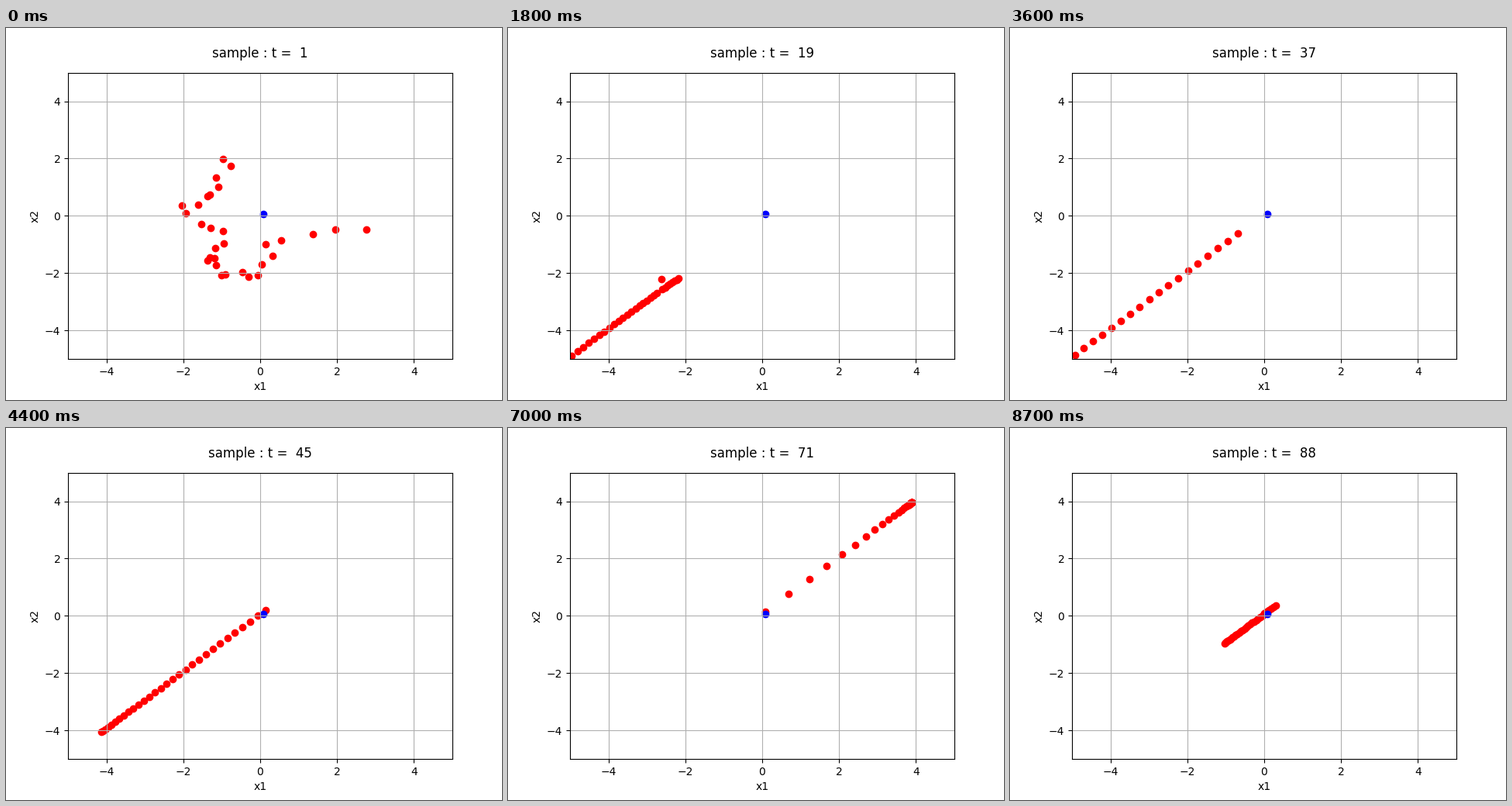
A matplotlib script that plays this animation: 640x480 px, repeating every 8800 ms.

```python
import numpy as np
import matplotlib.pyplot as plt
from matplotlib.animation import FuncAnimation

COUNT = 30
STEPS = 88
U = np.linspace(0, 1, COUNT)


def cloud():
    """Scatter the particles loosely along a winding path."""
    path = np.array([(-0.9, 2.0), (-1.05, 0.8), (-1.95, 0.1), (-1.0, -0.5),
                     (-1.3, -1.4), (-1.1, -2.0), (0.0, -2.1), (0.2, -0.9),
                     (2.8, -0.5)])
    knots = np.linspace(0, 1, len(path))
    points = np.column_stack([np.interp(U, knots, axis) for axis in path.T])
    return points + np.random.default_rng(4).normal(0, 0.1, points.shape)


def chain(a, b, power, slope=1.0, shift=0.07):
    """Diagonal row of particles from a to b, denser towards b."""
    x = a + (b - a) * (1 - (1 - U) ** power)
    return np.column_stack([x, slope * x + shift])


rise = chain(-1.45, 1.51, 2, slope=1.05, shift=0.005)
rise[8] += (0.08, 0.8)  # one particle strays from the row

# time, pose, and how far the swarm swings on its way to the next pose
POSES = [
    (1, cloud(), 4),
    (10, rise, -5),
    (29, chain(-1.51, -10.8, 1), 3.5),
    (45, chain(0.14, -4.13, 1.4), -4.6),
    (55, chain(0.18, -1.33, 2), 2.7),
    (71, chain(0.08, 3.89, 5), -5),
    (88, chain(0.30, -1.03, 1.3), 0),
]


def swarm(t):
    for (t0, p0, swing), (t1, p1, _) in zip(POSES, POSES[1:]):
        if t <= t1:
            break
    k = (t - t0) / (t1 - t0)
    ease = k * k * (3 - 2 * k)
    sway = swing * np.sin(2 * np.pi * k) * (0.85 + 0.3 * U)
    return p0 + (p1 - p0) * ease + sway[:, None]


fig, ax = plt.subplots(figsize=(6.4, 4.8), dpi=100)
ax.set(xlim=(-5, 5), ylim=(-5, 5), xlabel="x1", ylabel="x2")
ax.set_xticks(range(-4, 5, 2))
ax.set_yticks(range(-4, 5, 2))
ax.grid(True)
title = ax.set_title("", y=1.03)
dots = ax.scatter(U, U, c="red")
ax.scatter([0.09], [0.06], c="blue")


def draw(n):
    dots.set_offsets(swarm(n + 1))
    title.set_text(f"sample : t =  {n + 1}")
    return dots, title


anim = FuncAnimation(fig, draw, frames=STEPS, interval=100, repeat=True,
                     repeat_delay=0)
plt.show()
```
